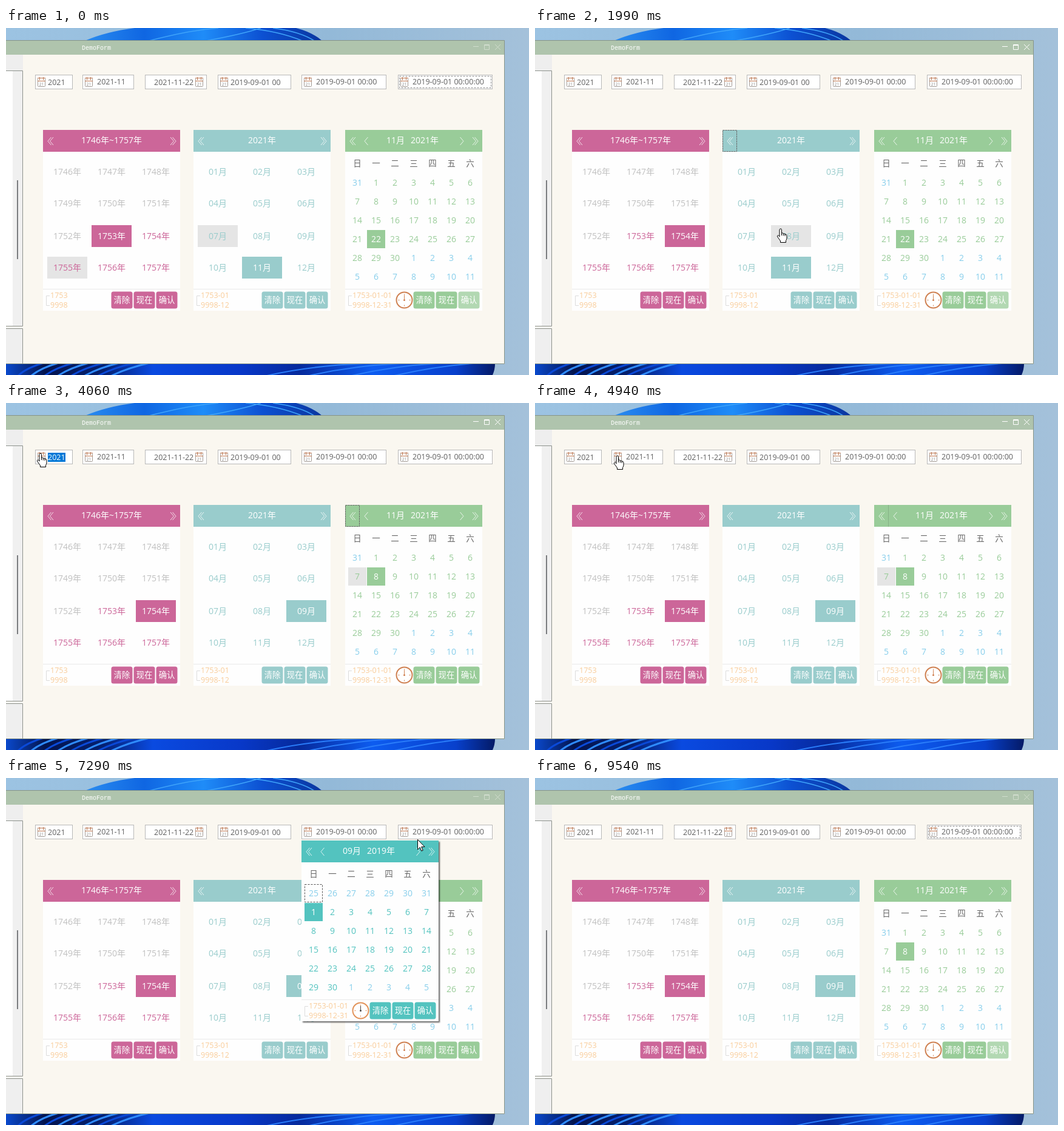
These frames come from a looping animation (862x572 px, 9.6 s). An HTML page:

```html
<!DOCTYPE html>
<html lang="zh-CN">
<head>
<meta charset="utf-8">
<title>Date pickers</title>
<style>
html, body { margin: 0; width: 100%; height: 100%; overflow: hidden; }
svg { display: block; width: 862px; height: 572px; font-family: "Open Sans", "Noto Sans", "Noto Sans CJK SC", "Noto Sans CJK", sans-serif; }
.mono { font-family: "Liberation Mono", monospace; }
</style>
</head>
<body>
<svg viewBox="0 0 862 572">
  <defs>
    <linearGradient id="sky"><stop stop-color="#9cc3e2"/><stop offset=".62" stop-color="#93b9d8"/><stop offset="1" stop-color="#a4c1da"/></linearGradient>
    <linearGradient id="petalTop"><stop stop-color="#2a8cf0"/><stop offset=".25" stop-color="#0f66e2"/><stop offset=".5" stop-color="#1f8cf8"/><stop offset=".75" stop-color="#0c50d2"/><stop offset="1" stop-color="#0a369f"/></linearGradient>
    <linearGradient id="petalLow"><stop stop-color="#0a49cc"/><stop offset=".08" stop-color="#04144e"/><stop offset=".2" stop-color="#052070"/><stop offset=".3" stop-color="#0a4ae0"/><stop offset=".48" stop-color="#0838c8"/><stop offset=".6" stop-color="#062a9c"/><stop offset=".75" stop-color="#0d5cf0"/><stop offset=".92" stop-color="#0840cc"/><stop offset="1" stop-color="#041a66"/></linearGradient>
    <filter id="soft"><feGaussianBlur stdDeviation="1.2"/></filter>
  </defs>
  <g id="backdrop"></g>
  <g id="scene"></g>
  <circle id="halo" r="13" fill="#fcf445" opacity=".75"/>
  <g id="cursor" fill="#fff" stroke="#000" stroke-linejoin="round">
    <g id="hand">
      <path d="M-2 1.5Q-2 0 0 0Q1.5 0 1.5 1.5V7Q3 6 4.3 8Q6 7.2 7 9Q9.5 8.5 10 11V16Q9.5 18 8.5 19.5V22.5H-.5V20L-5.5 13Q-6 11 -4.5 10.7Q-3 11 -2 13Z"/>
      <path d="M1.5 7V11M4.3 8V11.5M7 9V12" fill="none"/>
    </g>
    <path id="arrow" d="M.5 .5V17L4.3 13.3 6.8 19.3 9.2 18.2 6.7 12.4H12Z"/>
  </g>
</svg>
<script>
const LOOP = 9600;
const PINK = '#cc6699', PALE = '#99cccc', GREEN = '#99cc99', TEAL = '#53c3bf';
const $ = id => document.getElementById(id);

const rect = (x, y, w, h, fill, extra = '') =>
  `<rect x="${x}" y="${y}" width="${w}" height="${h}" fill="${fill}" ${extra}/>`;
const line = (d, color, width = 1) =>
  `<path d="${d}" fill="none" stroke="${color}" stroke-width="${width}"/>`;
const text = (x, y, s, fill, size = 14, anchor = 'middle') =>
  `<text x="${x}" y="${y}" fill="${fill}" font-size="${size}" text-anchor="${anchor}">${s}</text>`;
const frame = (x, y, w, h, color, dash = '') =>
  rect(x + .5, y + .5, w - 1, h - 1, 'none', `stroke="${color}" stroke-dasharray="${dash}"`);
const range = n => [...Array(n).keys()];
const pad = n => String(n).padStart(2, '0');

function backdrop() {
  const streaks = range(8).map(i =>
    line(`M${20 + i * 22} 573Q${34 + i * 24} 560 ${62 + i * 25} 552`, i % 2 ? '#2f8cff' : '#0a49d8', 3)).join('');
  const folds = range(4).map(i =>
    line(`M${430 + i * 70} 573Q${500 + i * 70} 557 ${590 + i * 60} 553`, '#2a7dfa', 2)).join('');
  return rect(0, 0, 862, 572, 'url(#sky)') +
    '<path d="M130 21Q165 6 212 0H478Q505 7 521 21Z" fill="url(#petalTop)"/>' +
    line('M236 21Q300 4 350 0M330 21Q390 10 420 0M395 0Q450 5 488 21M440 0Q485 6 508 21', '#3fa4fa', 1.5) +
    '<path d="M0 553H806Q806 563 802 572H0Z" fill="url(#petalLow)"/>' + streaks + folds;
}

function windowChrome(active) {
  const control = active ? '#fff' : '#d0dccd';
  return rect(0, 20, 822, 534, '#faf7f0') + rect(0, 20, 822, 24, '#afc4ad') +
    line('M0 20.5H821.5V553.5H0', '#879487') +
    `<g class="mono">${text(125, 36, 'DemoForm', '#fff', 10, 'start')}</g>` +
    line('M770 30.5H779M788.5 27.5H796.5V35.5H788.5ZM788 28.5H797M806 27L815 36M815 27L806 36', control) +
    rect(0, 44, 28, 26, '#eeeeee') + rect(0, 70, 11, 421, '#fff') + rect(11, 70, 16, 421, '#f0f0f0') +
    rect(18, 251, 2, 130, '#7b7d80') + rect(0, 496, 27, 57, '#efefef') +
    line('M0 70.5H27.5V491.5H0M0 495.5H27.5V553', '#8d918c');
}

const BOXES = [
  { x: 48, w: 62, icon: 52, tx: 69, base: 94, value: '2021' },
  { x: 126, w: 85, icon: 130, tx: 150, base: 93, value: '2021-11' },
  { x: 229, w: 102, icon: 312, tx: 244, base: 94, value: '2021-11-22' },
  { x: 349, w: 121, icon: 353, tx: 370, base: 94, value: '2019-09-01 00' },
  { x: 487, w: 140, icon: 491, tx: 511, base: 93, value: '2019-09-01 00:00' },
  { x: 646, w: 156, icon: 650, tx: 670, base: 93, value: '2019-09-01 00:00:00' }
];

const calendarIcon = x =>
  rect(x + .5, 82.5, 12, 14, '#fff', 'rx="1" stroke="#a29a94"') +
  line(`M${x} 82.5H${x + 13}M${x} 87.5H${x + 13}`, '#c4805c') +
  line(`M${x + 3.5} 81V86M${x + 9.5} 81V86`, '#b5714c') +
  text(x + 6.5, 95, '21', '#888', 6.5);

const inputBox = (b, focused, selected) =>
  rect(b.x, 77, b.w, 24, '#fff') + frame(b.x, 77, b.w, 24, '#b9b9b9') +
  (focused ? frame(b.x + 2, 79, b.w - 4, 20, '#8c8c8c', '3 2') : '') + calendarIcon(b.icon) +
  (selected ? rect(b.tx, 82, 29, 15, '#0078d7') : '') +
  text(b.tx, b.base, b.value, selected ? '#fff' : '#606060', 12.5, 'start');

const chevron = (x, y, dir) => `M${x + 2.5 * dir} ${y - 6.5}L${x - 3 * dir} ${y}L${x + 2.5 * dir} ${y + 6.5}`;

const clock = (x, y, rim, hand) =>
  `<circle cx="${x}" cy="${y}" r="13" fill="#fff" stroke="${rim}" stroke-width="2"/>` +
  line(`M${x} ${y - 10}v2M${x} ${y + 8}v2M${x - 10} ${y}h2M${x + 8} ${y}h2`, rim) +
  line(`M${x} ${y - 8}V${y}`, hand) + `<circle cx="${x}" cy="${y}" r="1.5" fill="${hand}"/>`;

// Cell geometry and labels for each picker kind, relative to the panel corner.
function cellsFor(p) {
  if (p.kind === 'day') return range(42).map(i => {
    const d = i - p.offset + 1, inside = d > 0 && d <= 30;
    return {
      x: 20 + i % 7 * 31, y: 87 + Math.floor(i / 7) * 31, w: 30, h: 30,
      label: inside ? d : d < 1 ? d + 31 : d - 30, color: inside ? p.color : '#87ceeb'
    };
  });
  return range(12).map(i => ({
    x: 40 + i % 3 * 73, y: [69, 121, 175, 227][Math.floor(i / 3)], w: 66, h: 36,
    label: p.kind === 'year' ? `${p.start + i}年` : `${pad(i + 1)}月`,
    color: p.kind === 'year' && p.start + i < 1753 ? '#c0c0c0' : p.color
  }));
}

function panel(p) {
  const day = p.kind === 'day';
  const arrows = chevron(11, 18.5, 1) + chevron(14.5, 18.5, 1) + chevron(212.5, 18.5, -1) + chevron(216, 18.5, -1) +
    (day ? chevron(35, 18.5, 1) + chevron(192, 18.5, -1) : '');
  const header = day
    ? text(83, 22, `${pad(p.month)}月`, '#fff') + text(131, 22, `${p.year}年`, '#fff')
    : text(113, 22, p.kind === 'year' ? `${p.start}年~${p.start + 11}年` : `${p.year}年`, '#fff');
  const weekdays = day ? [...'日一二三四五六'].map((s, i) => text(20 + i * 31, 60, s, '#666', 13.5)).join('') : '';
  const cells = cellsFor(p).map((c, i) => {
    const fill = i === p.sel ? p.color : i === p.hover ? '#e5e5e5' : '';
    const left = c.x - c.w / 2, top = c.y - c.h / 2;
    return (fill ? rect(left, top, c.w, c.h, fill) : '') +
      (i === p.dashed ? frame(left, top, c.w, c.h, '#555', '3 2') : '') +
      text(c.x, c.y + 4.5, c.label, i === p.sel ? '#fff' : c.color);
  }).join('');
  const focus = { dashed: frame(0, 0, 24, 36, '#666', '3 1'), edge: line('M23.5 0V36', '#86b286') }[p.focus] || '';
  const suffix = { year: ['', ''], month: ['-01', '-12'], day: ['-01-01', '-12-31'] }[p.kind];
  const limits = line('M11 273.5H5.5V289.5H11', '#dcdcdc') +
    text(12, 277, '1753' + suffix[0], '#f9cc99', 12.5, 'start') + text(12, 293, '9998' + suffix[1], '#f9cc99', 12.5, 'start');
  const buttons = ['清除', '现在', '确认'].map((s, i) =>
    `<g opacity="${i === 2 && p.locked ? .75 : 1}">` + rect(112.5 + i * 37, 266.5, 35, 28, p.color, 'rx="3.5"') +
    text(130 + i * 37, 284.5, s, '#fff', 13.3) + '</g>').join('');
  return `<g transform="translate(${p.x} ${p.y})">` +
    (p.popup ? rect(2, 2, 226, 298, '#000', 'opacity=".6" filter="url(#soft)"') : '') +
    rect(0, 0, 226, 298, '#fefefe') + rect(0, 0, 226, 36, p.color) +
    `<g opacity=".8">${line(arrows, '#fff')}</g>` + focus +
    header + weekdays + cells + line('M0 262.5H226', '#e9e9e9') + limits +
    (day ? clock(97.5, 280.5, p.popup ? '#e2935a' : '#cf8152', p.popup ? '#444' : '#cf8152') : '') + buttons + '</g>';
}

const dayPopup = (x, color) =>
  ({ kind: 'day', x, color, offset: 7, month: 9, year: 2019, sel: 7, dashed: 0 });
const POPUPS = [
  { from: 4190, to: 4940, kind: 'year', x: 48, color: TEAL, start: 2010, sel: 11 },
  { from: 5080, to: 5790, kind: 'month', x: 126, color: TEAL, year: 2021, sel: 10 },
  { from: 5930, to: 6960, ...dayPopup(349, TEAL) },
  { from: 7090, to: 7900, ...dayPopup(487, TEAL) },
  { from: 8300, to: 8720, ...dayPopup(646, PINK) }
];

function scene(t) {
  const during = (a, b) => t >= a && t < b;
  const popup = POPUPS.find(p => during(p.from, p.to));
  const active = during(70, 9530) && !popup;
  const focused = t < 840 || t >= 8720 ? 5 : during(5790, 5930) ? 1 : -1;
  const panels = [
    { kind: 'year', x: 61, color: PINK, start: 1746, sel: t < 840 ? 7 : 8, hover: t < 560 ? 9 : -1,
      focus: during(840, 1860) && 'dashed' },
    { kind: 'month', x: 309, color: PALE, year: 2021, sel: t < 2250 ? 10 : 8,
      hover: t < 1860 ? 6 : t < 2150 ? 7 : -1, focus: during(1860, 2850) && 'dashed' },
    { kind: 'day', x: 559, color: GREEN, offset: 1, month: 11, year: 2021, sel: t < 2850 ? 22 : 8,
      hover: during(2980, 8900) ? 7 : -1, focus: during(2850, 4940) ? 'dashed' : during(4940, 6010) && 'edge',
      locked: !during(2850, 8900) }
  ];
  return windowChrome(active) +
    BOXES.map((b, i) => inputBox(b, i === focused, i === 0 && during(3980, 4940))).join('') +
    panels.map(p => panel({ ...p, y: 168 })).join('') +
    (popup ? panel({ ...popup, y: 103, popup: true }) : '');
}

// time, x, y, hand pointer
const PATH = [
  [70, 548, 541, 0], [400, 400, 430, 0], [700, 247, 342, 1], [840, 247, 342, 1], [980, 137, 272, 1],
  [1050, 137, 272, 1], [1580, 384, 316, 1], [1790, 384, 316, 1], [1990, 405, 331, 1], [2200, 490, 338, 1],
  [2480, 492, 338, 1], [2780, 612, 284, 1], [2900, 612, 284, 1], [3020, 577, 287, 1], [3100, 540, 270, 0],
  [3440, 102, 95, 0], [3510, 100, 94, 0], [3850, 57, 83, 1], [4200, 57, 83, 1], [4260, 75, 86, 0],
  [4400, 158, 92, 0], [4740, 136, 87, 1], [5300, 136, 87, 1], [5400, 160, 90, 0], [5800, 355, 88, 1],
  [6270, 355, 88, 1], [6340, 368, 89, 0], [6810, 518, 90, 0], [6940, 497, 87, 1], [7130, 497, 87, 1],
  [7180, 540, 92, 0], [7290, 678, 101, 0], [7640, 657, 87, 1], [8480, 657, 87, 1], [8560, 645, 122, 0],
  [8800, 612, 220, 0], [9240, 486, 574, 0]
];
const CLICKS = [800, 2220, 2820, 3970, 4950, 5860, 6960, 7910, 8250];

function pointer(t) {
  const i = Math.max(0, PATH.findLastIndex(k => k[0] <= t));
  const a = PATH[i], b = PATH[i + 1] || a;
  const u = b === a ? 0 : Math.max(0, (t - a[0]) / (b[0] - a[0]));
  const e = u * u * (3 - 2 * u);
  return { x: Math.round(a[1] + (b[1] - a[1]) * e), y: Math.round(a[2] + (b[2] - a[2]) * e), hand: a[3] };
}

let drawn = '';
function render(t) {
  const markup = scene(t);
  if (markup !== drawn) $('scene').innerHTML = drawn = markup;
  const { x, y, hand } = pointer(t);
  const at = `translate(${x} ${y})`;
  const show = (id, on) => $(id).setAttribute('display', on ? 'inline' : 'none');
  $('cursor').setAttribute('transform', at);
  $('halo').setAttribute('transform', at);
  show('cursor', t >= 70 && t < 9250);
  show('hand', hand);
  show('arrow', !hand);
  show('halo', CLICKS.some(c => t >= c && t < c + 70));
}

$('backdrop').innerHTML = backdrop();
const begin = performance.now();
function tick() {
  render((performance.now() - begin) % LOOP);
  requestAnimationFrame(tick);
}
tick();
</script>
</body>
</html>
```
